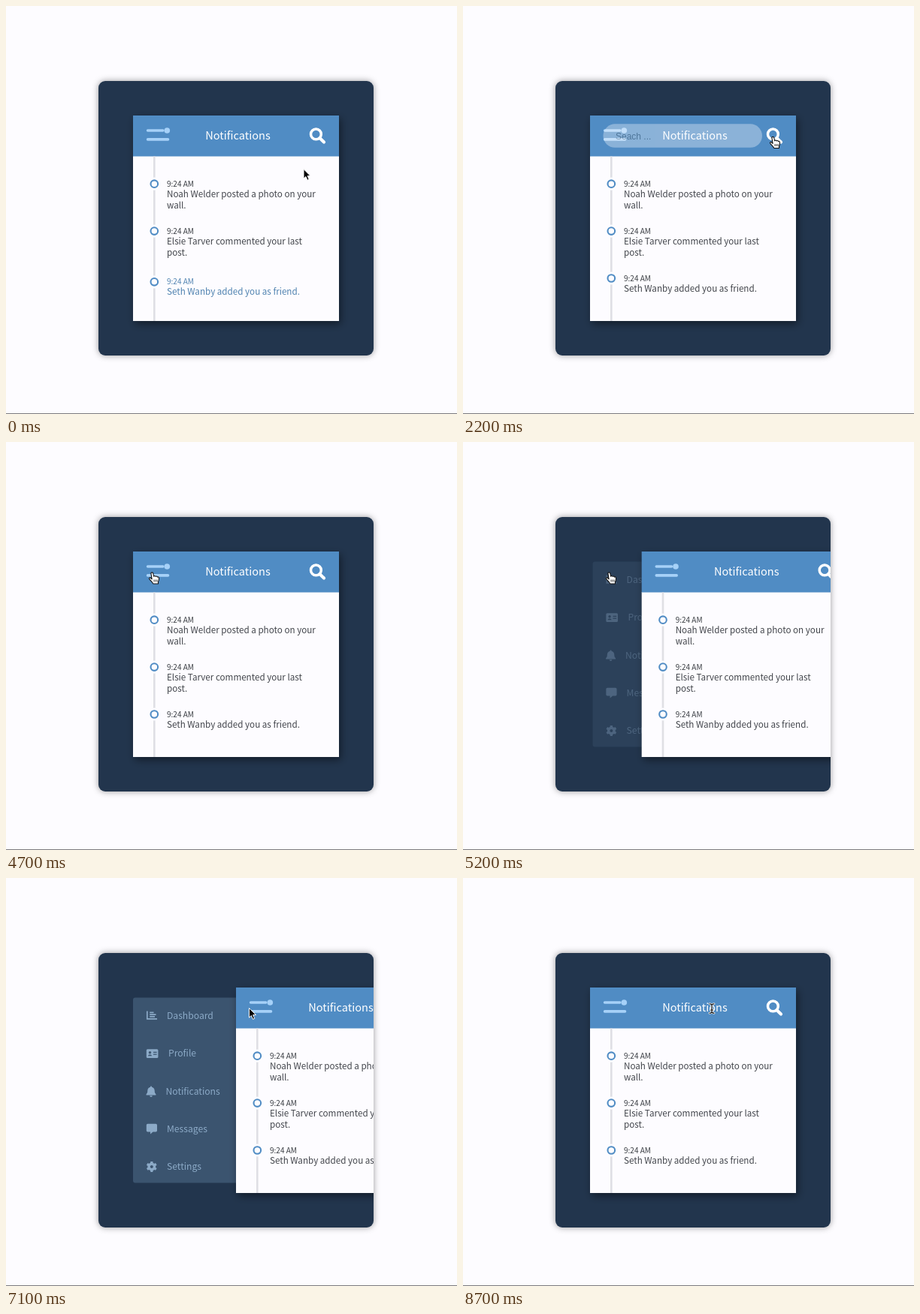
Animation of 600x544 px, one loop 8.8 s. Source, as an HTML page:

```html
<!DOCTYPE html>
<html lang="en">
<head>
<meta charset="utf-8">
<title>Notifications panel</title>
<style>
  html, body { margin: 0; width: 100%; height: 100%; overflow: hidden; background: #fdfcff; }
  svg { display: block; width: 600px; height: 544px; }
  text { font-family: "Noto Sans CJK JP", "Noto Sans CJK SC", "Noto Sans CJK KR", "Noto Sans CJK", "Open Sans", sans-serif; white-space: pre; }
  .title { font-size: 14.55px; font-weight: 500; fill: #fff; }
  .time { font-size: 10px; }
  .body { font-size: 11.65px; }
  .menu-item { font-size: 12.15px; }
  #hint { font-family: "Liberation Sans", Arial, sans-serif; font-size: 12px; fill: #4c4c4c; }
</style>
</head>
<body>
<svg viewBox="0 0 600 544">
  <defs>
    <clipPath id="frame"><rect x="123" y="100" width="366" height="366" rx="9"/></clipPath>
    <filter id="frameShadow" x="-10%" y="-10%" width="120%" height="120%">
      <feDropShadow dx="0" dy="0" stdDeviation="4" flood-color="#000" flood-opacity=".4"/>
    </filter>
    <filter id="cardShadow" x="-15%" y="-15%" width="130%" height="130%">
      <feGaussianBlur stdDeviation="5.5"/>
    </filter>
  </defs>

  <rect width="600" height="544" fill="#fdfcff"/>
  <rect y="543" width="600" height="1" fill="#7b7b7d"/>
  <rect x="123" y="100" width="366" height="366" rx="9" fill="#21364d" filter="url(#frameShadow)"/>

  <g clip-path="url(#frame)">
    <g id="menu" fill="#8caac7">
      <rect x="169" y="159.5" width="140" height="247" rx="3" fill="#3b546f"/>
      <path d="M187.8 177.5V187.8H201M191.2 179.3H196.5M191.2 182.1H199.5M191.2 184.9H198" fill="none" stroke="#8caac7" stroke-width="1.7"/>
      <g>
        <rect x="186.8" y="228.2" width="15.6" height="11.8" rx="1.5"/>
        <path d="M189 237.3c0-2.4 5-2.4 5 0zM196 231.8h4.6v1.3H196zM196 234.4h4.6v1.3H196z" fill="#3b546f"/>
        <circle cx="191.5" cy="232.7" r="1.7" fill="#3b546f"/>
      </g>
      <path d="M193 277.6a1 1 0 0 1 1 1.1c2.5.6 3.7 2.4 3.7 4.9 0 2.7.7 3.6 1.6 4.6.6.7.2 1.4-.6 1.4H187.3c-.8 0-1.2-.7-.6-1.4.9-1 1.6-1.9 1.6-4.6 0-2.5 1.2-4.3 3.7-4.9a1 1 0 0 1 1-1.1zM191.2 290.3h3.6a1.8 1.8 0 0 1-3.6 0z"/>
      <path d="M188.5 327.8h10.8a1.7 1.7 0 0 1 1.7 1.7v7.3a1.7 1.7 0 0 1-1.7 1.7H195.5l-3.5 3v-3h-3.5a1.7 1.7 0 0 1-1.7-1.7v-7.3a1.7 1.7 0 0 1 1.7-1.7z"/>
      <g id="gear" transform="translate(193.8 384.9)">
        <circle r="3.7" fill="none" stroke="#8caac7" stroke-width="3.4"/>
      </g>
      <g id="menuLabels"></g>
    </g>

    <g id="card">
      <rect x="171.5" y="150" width="274" height="274" fill-opacity=".45" filter="url(#cardShadow)"/>
      <rect x="169" y="200" width="274" height="220" fill="#fdfcff"/>
      <rect x="169" y="146" width="274" height="54.5" fill="#508cc4"/>
      <path d="M197.3 200.5V420" stroke="#dfdfe4" stroke-width="2.6"/>
      <g id="notes"></g>
      <text class="title" x="265.3" y="177.6">Notifications</text>
      <path d="M188.6 166H208.8M188.6 177.9H215.5" stroke="#a6d1f8" stroke-width="3.6" stroke-linecap="round"/>
      <circle cx="214.3" cy="166" r="3.8" fill="#a6d1f8"/>
      <g id="field">
        <rect x="186.5" y="157.3" width="211.5" height="31.5" rx="15.75" fill="#fdfdff"/>
        <text id="hint" x="203" y="177.5">Seach ...</text>
      </g>
      <g fill="none" stroke="#fff">
        <circle cx="412.4" cy="170.9" r="6.9" stroke-width="3.5"/>
        <path d="M417.6 176.2L423 181.6" stroke-width="4.2" stroke-linecap="round"/>
      </g>
    </g>
  </g>

  <g id="cursor" stroke-linejoin="round">
    <path id="arrow" d="M0 0V12.6L2.9 9.9L5 14.8L7.2 13.8L5.1 9.1H9Z" fill="#000" stroke="#fff"/>
    <g id="hand" fill="#fff" stroke="#111" stroke-width="1.1">
      <path d="M-1.6 1.1C-1.7-.4 .9-.5 1.2 1L2.2 5.3C2.5 4.1 4.4 4.2 4.7 5.5C5.1 4.7 6.8 4.9 7.1 6.2C7.7 5.6 8.9 6 9 7.3C9.2 9.7 8.7 11.2 8 12.5V15H1.2C.9 13.5-1.3 11.7-3.4 9.2C-4.8 7.5-3.4 6.4-2 7.3L-.4 8.8Z"/>
      <path d="M2.5 9.5V12.5M4.5 9.5V12.5M6.5 9.5V12.5" fill="none" stroke-width=".8"/>
    </g>
    <g id="beam" fill="none" stroke-linecap="round">
      <path id="beamShape" d="M-3-6.2Q0-6.2 0-4.2Q0-6.2 3-6.2M0-4.5V4.5M-3 6.2Q0 6.2 0 4.2Q0 6.2 3 6.2M-1.5 2H1.5" stroke="#fff" stroke-width="2.8"/>
      <path d="M-3-6.2Q0-6.2 0-4.2Q0-6.2 3-6.2M0-4.5V4.5M-3 6.2Q0 6.2 0 4.2Q0 6.2 3 6.2M-1.5 2H1.5" stroke="#111" stroke-width="1.2"/>
    </g>
  </g>
</svg>

<script>
const LOOP = 8800, STEP = 100, SLIDE = 137, MENU_SHIFT = 60;
const $ = id => document.getElementById(id);
const SVG = "http://www.w3.org/2000/svg";

function add(parent, tag, attrs, content = "") {
  const node = document.createElementNS(SVG, tag);
  for (const key in attrs) node.setAttribute(key, attrs[key]);
  node.textContent = content;
  return parent.appendChild(node);
}

const menuLabels = [["Dashboard", 214], ["Profile", 216], ["Notifications", 212.5], ["Messages", 214], ["Settings", 214]];
menuLabels.forEach(([label, x], i) =>
  add($("menuLabels"), "text", { class: "menu-item", x, y: 188 + i * 50.35 }, label));

for (let i = 0; i < 6; i++) {
  add($("gear"), "rect", { x: -1.7, y: -7, width: 3.4, height: 3.5, rx: 0.6, transform: `rotate(${i * 60})` });
}

const notes = [
  ["Noah Welder posted a photo on your", "wall."],
  ["Elsie Tarver commented your last", "post."],
  ["Seth Wanby added you as friend."]
].map((lines, i) => {
  const y = 237.2 + i * 62.9;
  const group = add($("notes"), "g", {});
  add(group, "circle", { cx: 197.3, cy: y, r: 8.6, fill: "#fdfcff" });
  add(group, "circle", { cx: 197.3, cy: y, r: 4.8, fill: "#fdfcff", stroke: "#508cc4", "stroke-width": 2.1 });
  const time = add(group, "text", { class: "time", x: 214, y: y + 3.7, fill: "#383c41" }, "9:24 AM");
  const body = lines.map((line, n) =>
    add(group, "text", { class: "body", x: 214, y: y + 17.6 + n * 15, fill: "#42454b" }, line));
  return { group, texts: [time, ...body] };
});

const clamp = v => Math.min(1, Math.max(0, v));
const mix = (a, b, k) => a + (b - a) * k;

// cubic-bezier(.25, .1, .25, 1), solved by bisection
function ease(x) {
  const curve = (a, b, s) => 3 * a * s * (1 - s) ** 2 + 3 * b * s * s * (1 - s) + s ** 3;
  let lo = 0, hi = 1;
  for (let i = 0; i < 24; i++) {
    const mid = (lo + hi) / 2;
    if (curve(0.25, 0.25, mid) < x) lo = mid; else hi = mid;
  }
  return curve(0.1, 1, lo);
}
const ramp = (t, start, length) => ease(clamp((t - start) / length));
const smooth = k => k * k * (3 - 2 * k);

// time, x, y of the pointer's hot spot
const path = [
  [0, 396, 217.5], [700, 412.5, 174.5], [2700, 412.5, 174.5], [3400, 209.5, 180.5],
  [3600, 205, 179], [4200, 194.5, 174], [5550, 194.5, 174], [6100, 291, 182.5],
  [6400, 306, 181], [7600, 334, 169], [8000, 334, 169], [8600, 336, 172], [8700, 331, 174]
];
const shapes = [
  [0, "arrow"], [500, "hand"], [2800, "beam"], [3900, "hand"], [5700, "arrow"],
  [7200, "hand"], [8000, "beam"]
];

function pointer(t) {
  const next = path.findIndex(p => p[0] > t);
  if (next < 0) return path[path.length - 1].slice(1);
  const [t0, x0, y0] = path[next - 1], [t1, x1, y1] = path[next];
  const k = smooth((t - t0) / (t1 - t0));
  return [mix(x0, x1, k), mix(y0, y1, k)];
}

function tint(from, to, k) {
  return `rgb(${from.map((c, i) => Math.round(mix(c, to[i], k)))})`;
}

function draw(t) {
  const closing = ramp(t, 7845, 500);
  const open = ramp(t, 5053, 500) - closing;
  $("card").setAttribute("transform", `translate(${open * SLIDE} 0)`);

  const shift = 1 - ramp(t, 5053, 210) + closing;
  $("menu").setAttribute("transform", `translate(${shift * MENU_SHIFT} 0)`);
  $("menu").setAttribute("opacity", ramp(t, 5075, 500) - closing);

  $("field").setAttribute("opacity", ramp(t, 1080, 520) - ramp(t, 2000, 520));

  const latest = notes[2];
  latest.group.setAttribute("transform", `translate(0 ${4.8 * (1 - ramp(t, 0, 350))})`);
  const settled = clamp(t / 700);
  latest.texts.forEach((node, i) =>
    node.setAttribute("fill", tint([79, 130, 176], i ? [66, 69, 75] : [56, 60, 65], settled)));

  const [x, y] = pointer(t);
  $("cursor").setAttribute("transform", `translate(${x} ${y})`);
  const shape = shapes.filter(s => s[0] <= t).pop()[1];
  for (const id of ["arrow", "hand", "beam"]) $(id).style.display = id === shape ? "" : "none";
}

const began = performance.now();
function tick() {
  const t = (performance.now() - began) % LOOP;
  draw(Math.floor(t / STEP) * STEP);
  requestAnimationFrame(tick);
}
tick();
</script>
</body>
</html>
```
